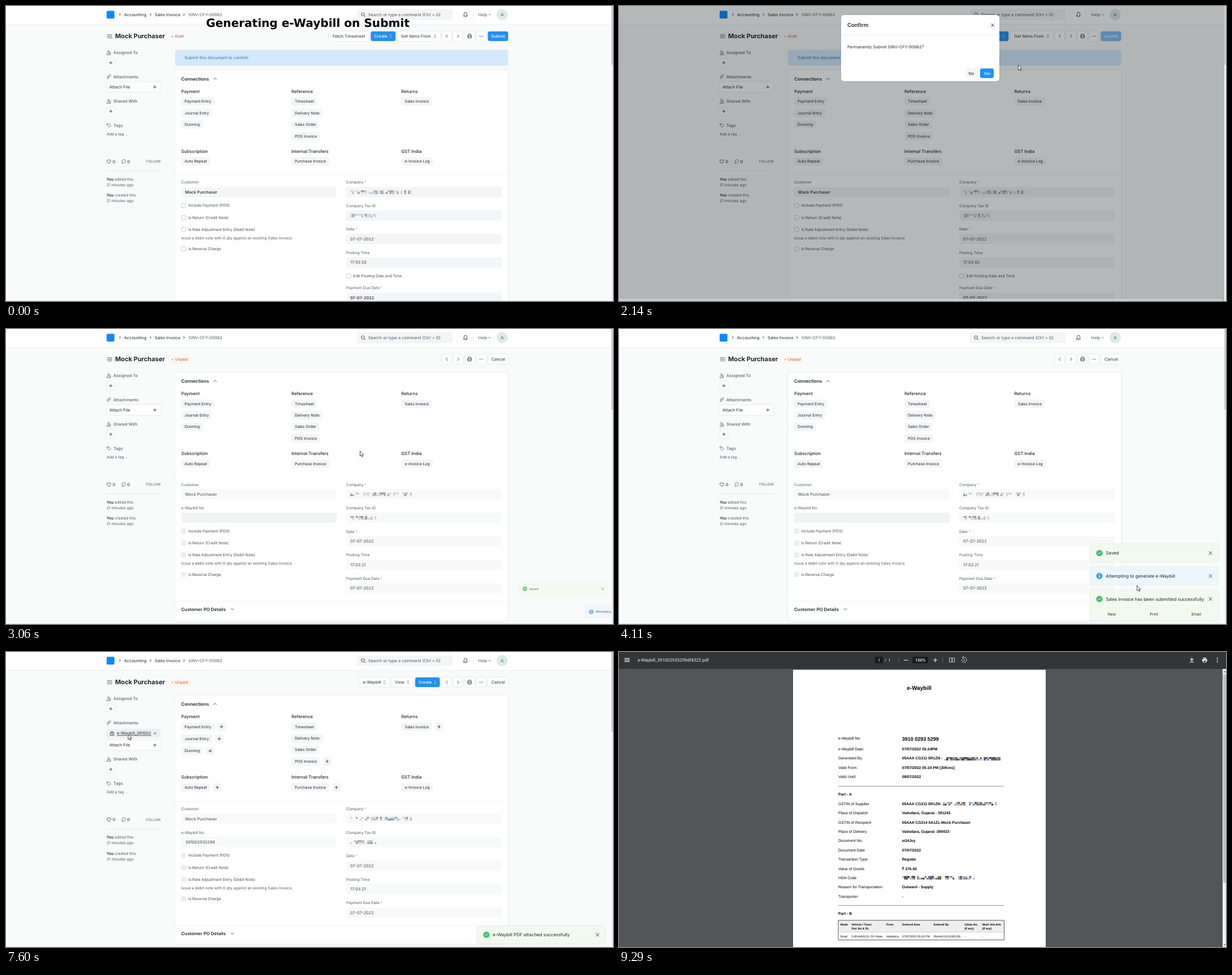
An HTML page that plays this animation: 1074x522 px, repeating every 9.32 s.

```html
<!DOCTYPE html>
<html lang="en">
<head>
<meta charset="utf-8">
<title>Generating e-Waybill on Submit</title>
<style>
  html, body { margin: 0; width: 100%; height: 100%; overflow: hidden; background: #f9fafa; }
  svg { display: block; width: 1074px; height: 522px; text-rendering: geometricPrecision; }
  text { font-family: Inter, sans-serif; white-space: pre; }
  .pdf text { font-family: "Liberation Sans", Arial, sans-serif; }
  .bar text { font-family: Roboto, sans-serif; }
  .caption { font: bold 20.1px "DejaVu Sans", sans-serif; }
  .line { fill: none; stroke-width: .8; stroke-linecap: round; stroke-linejoin: round; }
</style>
</head>
<body>
<svg id="stage" viewBox="0 0 1074 522" xmlns="http://www.w3.org/2000/svg"></svg>
<script>
const LOOP = 9320;
const NAME = 'Mock Purchaser';
const INK = '#1f272e', GREY = '#505a62', BLUE = '#2490ef', PILL = '#f4f5f6', EDGE = '#e4e8ea';
const pen = document.createElement('canvas').getContext('2d');

// Drawing helpers: y of a text is the middle of its capitals.
function text(x, y, size, str, { w = 400, f = INK, a = 'start', extra = '' } = {}) {
  return `<text x="${x}" y="${y + size * .36}" font-size="${size}" font-weight="${w}" fill="${f}" text-anchor="${a}" ${extra}>${str}</text>`;
}
const rect = (x, y, w, h, fill, r = 0, extra = '') =>
  `<rect x="${x}" y="${y}" width="${w}" height="${h}" fill="${fill}" rx="${r}" ${extra}/>`;
const line = (d, color = GREY, width = .8) =>
  `<path class="line" d="${d}" stroke="${color}" style="stroke-width:${width}"/>`;
const circle = (x, y, r, fill, extra = '') => `<circle cx="${x}" cy="${y}" r="${r}" fill="${fill}" ${extra}/>`;
const group = (id, body, extra = '') => `<g id="${id}" ${extra}>${body}</g>`;
const plus = (x, y, c = INK) => line(`M${x - 2.5} ${y}h5m-2.5-2.5v5`, c);
const cross = (x, y, r = 2.4, c = INK) => line(`M${x - r} ${y - r}l${2 * r} ${2 * r}m0-${2 * r}l-${2 * r} ${2 * r}`, c, .9);
const right = (x, y, c = INK, s = 1) => line(`M${x - s} ${y - 2 * s}l${2 * s} ${2 * s}l-${2 * s} ${2 * s}`, c, .9);
const left = (x, y) => line(`M${x + 1.2} ${y - 2.4}l-2.4 2.4l2.4 2.4`, INK, .9);
const down = (x, y, c = INK, s = 2) => line(`M${x - s} ${y - s / 2}l${s} ${s}l${s}-${s}`, c);
const sorter = (x, y, c) => line(`M${x - 1.4} ${y - 1.2}l1.4-1.4l1.4 1.4M${x - 1.4} ${y + 1.2}l1.4 1.4l1.4-1.4`, c, .7);
const shadow = 'style="filter:drop-shadow(0 .5px 1px rgba(25,39,52,.16))"';

function width(str, size) {
  pen.font = '400 100px Inter, sans-serif';
  return pen.measureText(str).width * size / 100;
}

function mosaic(x, y, w, h, seed, colors, fill = .8) {
  const rnd = () => (seed = (seed * 16807) % 2147483647) / 2147483647;
  const cw = 3.3, ch = h / 2;
  let out = '';
  for (let i = 0; i < w / cw; i++) {
    const gap = rnd() > .88;
    for (let j = 0; j < 2; j++) {
      const c = colors[Math.floor(rnd() * colors.length)];
      if (rnd() < fill && !gap) out += rect(x + i * cw, y + j * ch, cw, ch, c);
    }
  }
  return out;
}
const soft = ['#8b949d', '#b9c0c7', '#d5dbe0', '#c3d5e5', '#e0d3c5', '#a5abb2'];
const strong = ['#2f3743', '#8a6a55', '#6d87a5', '#b9aaa0', '#51565f', '#a8bccf'];

function button(x, w, label, { primary, arrows, y = 53.5, id = '' } = {}) {
  const f = primary ? '#fff' : INK;
  return rect(x, y - 8.5, w, 17, primary ? BLUE : '#fff', 3.4, shadow + id) +
    text(x + 6, y, 7.3, label, { f, w: primary ? 500 : 400 }) +
    (arrows ? sorter(x + w - 8.5, y, f) : '');
}

function navbar() {
  return rect(0, 0, 1074, 32.5, '#fff') + rect(0, 32, 1074, .8, '#e8ecee') +
    rect(178, 8.5, 13.8, 13.8, '#0a89ff', 2) +
    right(201.5, 15) + text(209, 15, 7.35, 'Accounting') +
    right(255.8, 15) + text(263, 15, 7.3, 'Sales Invoice') +
    right(315, 15) + text(322.8, 15, 7.25, 'SINV-CFY-00062', { f: GREY }) +
    rect(621, 5.5, 169, 19.5, PILL, 4) +
    circle(631.5, 14.8, 2.8, 'none', `stroke="${INK}" stroke-width=".8"`) + line('M633.6 17l2 2', INK) +
    text(641, 15.3, 7.33, 'Search or type a command (Ctrl + G)', { f: GREY }) +
    line('M809.5 17.8h7c-1.3-1.2-1-2.5-1-4a2.5 2.7 0 0 0-5 0c0 1.500 .3 2.800-1 4zm2.500 1.300a1.200 1.200 0 0 0 2 0', INK) +
    rect(826, 9, .7, 12, '#dde2e5') + text(835.5, 15, 7.3, 'Help', { f: GREY }) + down(855.6, 15.5, GREY, 1.8) +
    circle(877.8, 15.3, 10, '#dcebe7') + text(877.8, 15.3, 7.6, 'A', { a: 'middle', f: '#41645a' });
}

function tools() {
  const box = x => rect(x, 45, 16.5, 17, '#fff', 3.4, shadow);
  return [771.6, 791.6, 812, 832.5].map(box).join('') +
    left(779.8, 53.5) + right(800, 53.5, INK, 1.2) +
    line('M818 52v-2.300h4.500v2.300m-4.500 3.300h-1.200v-3.300h6.900v3.300h-1.200m-4.500-1.200h4.500v2.800h-4.500z', INK, .7) +
    [837.9, 840.6, 843.3].map(x => circle(x, 53.5, .65, INK)).join('');
}

function sidebar() {
  const head = (y, label) => text(190, y, 7.3, label, { w: 500, f: '#57626b' });
  const add = y => circle(185.5, y, 8, '#fff', shadow) + plus(185.5, y);
  const log = (y, verb) => text(178, y, 6.75, `<tspan font-weight="600" fill="${INK}">You</tspan> ${verb} this`, { f: GREY }) +
    text(178, y + 10, 6.75, '21 minutes ago', { f: GREY });
  const person = y => circle(181.5, y - 1.7, 1.6, 'none', `stroke="${GREY}" stroke-width=".8"`) +
    line(`M178.500 ${y + 3.300}c0-3.500 6-3.500 6 0zm6.200-3.800v3`);
  return person(82.5) + head(82.5, 'Assigned To') + add(100.5) +
    line('M179 126l3.400-3.700c1.500-1.500 3.700 .3 2.200 2l-3.700 4c-1 1-2.500-.2-1.500-1.300l3.200-3.500') + head(125.3, 'Attachments') +
    group('file', rect(178, 136, 95.500, 15.800, '#edf0f1', 3) +
      line('M185 142.800h5.600v4.600h-5.600zm1.200 0c0-3.600 3.200-3.600 3.200 0m-1.600 1.600v1.400', INK) +
      '<clipPath id="cut"><path d="M195 136h62v16h-62z"/></clipPath>' +
      text(196, 143.800, 7.3, 'e-Waybill_391002935299', { extra: 'clip-path="url(#cut)" text-decoration="underline"' }) +
      cross(263.500, 144, 1.700, GREY)) +
    group('side', rect(178, 134.500, 95.500, 17.500, '#fff', 3, shadow) + text(183, 143.3, 7.3, 'Attach File') + plus(263.300, 143.300) +
      person(168.500) + head(168.300, 'Shared With') + add(186.300) +
      line('M179 208.500h3l3.500 3.300-2.900 2.900-3.600-3.400zm1.500 1.500v.1') + head(211.300, 'Tags') +
      text(178, 226.300, 6.75, 'Add a tag ...', { f: GREY }) +
      line('M182 278.500l-3-3c-1.800-2.500 1.500-4.600 3-2.200c1.500-2.400 4.800-.3 3 2.200z', INK) + text(188.800, 275.300, 7.3, '0') +
      text(197.500, 275, 7, '·', { f: GREY }) +
      line('M205.500 278.500v-2a3.300 3 0 1 1 2.500 1.300z') + text(214.500, 275.300, 7.3, '0') +
      text(248, 275, 6.1, 'FOLLOW', { f: GREY }) + rect(178, 291.500, 96, .8, '#dfe4e6') +
      log(306.300, 'edited') + log(335, 'created'));
}

// mode 0: draft, 1: submitted, 2: submitted with actions
function form(mode) {
  const up = mode ? -36.8 : 0, grown = mode === 2, low = up + (grown ? 1.4 : 0), d = up + (grown ? 2.4 : 0);
  const pill = (x, y, label, more) => {
    const w = width(label, 6.83) + 11.5;
    return rect(x, y - 7.3, w, 14.6, PILL, 3) + text(x + 6, y, 6.83, label) +
      (more && grown ? rect(x + w + 5.300, y - 7.3, 15, 14.6, PILL, 3) + plus(x + w + 12.8, y) : '');
  };
  const list = (x, y, title, names, more) => text(x, y, 7.8, title, { w: 500 }) +
    names.map((n, i) => pill(x, y + 18 + i * (grown && x < 400 ? 21.4 : 20.4), n, more.includes(n))).join('');
  const field = (x, y, label, value, req, bg = mode ? '#f8f9f9' : PILL, w = 400) =>
    text(x, y, 6.72, label + (req ? ' <tspan fill="#f08c78">*</tspan>' : ''), { f: GREY }) +
    rect(x, y + 8.200, 275, 18, bg, 3) + text(x + 7, y + 17.3, 7.3, value, { w, f: w > 400 ? INK : '#414b53' });
  const check = (x, y, label) =>
    rect(x + .5, y - 3.700, 7.500, 7.500, mode ? '#eef0f1' : '#fff', 1.800, `stroke="${mode ? '#d3d8db' : '#a9b2b9'}" stroke-width=".7"`) +
    text(x + 12.600, y, 6.72, label, { f: '#3f4a53' });
  const top = 113.5 + up, R = 602, L = 310, row = i => 312 + d + 41.5 * i;
  const c = mode ? 394.3 + d : 353;

  let out = rect(299, top, 589.5, 440, '#fff', 4, shadow) +
    text(L, 129 + up, 8, 'Connections', { w: 600 }) + line(`M367.500 ${130 + up}l2.500-2.400l2.500 2.400`, INK) +
    list(L, 151 + up, 'Payment', ['Payment Entry', 'Journal Entry', 'Dunning'], ['Payment Entry', 'Journal Entry', 'Dunning']) +
    list(505, 151 + up, 'Reference', ['Timesheet', 'Delivery Note', 'Sales Order', 'POS Invoice'], ['POS Invoice']) +
    list(699.5, 151 + up, 'Returns', ['Sales Invoice'], ['Sales Invoice']) +
    list(L, 257 + low, 'Subscription', ['Auto Repeat'], ['Auto Repeat']) +
    list(505, 257 + low, 'Internal Transfers', ['Purchase Invoice'], ['Purchase Invoice']) +
    list(699.5, 257 + low, 'GST India', ['e-Invoice Log'], []) +
    rect(299, 298.500 + d, 589.500, .7, '#edf0f2') +
    field(L, row(0), 'Customer', NAME, false, mode ? '#f8f9f9' : PILL, mode ? 400 : 500) +
    check(L, c, 'Include Payment (POS)') + check(L, c + 21.300, 'Is Return (Credit Note)') +
    check(L, c + 42.200, 'Is Rate Adjustment Entry (Debit Note)') +
    text(L, c + 57.300, 6.78, 'Issue a debit note with 0 qty against an existing Sales Invoice', { f: GREY }) +
    check(L, c + 76.700, 'Is Reverse Charge') +
    field(R, row(0), 'Company', '', true) + field(R, row(1), 'Company Tax ID', '') +
    mosaic(609, row(0) + 14.200, 106, 6.400, 71 + mode, soft, .72) + mosaic(609, row(1) + 14.200, 46, 6.400, 911 + mode, soft, .75) +
    field(R, row(2), 'Date', '07-07-2022', true) +
    field(R, row(3), 'Posting Time', mode ? '17:03:21' : '17:03:02');
  if (!mode) {
    out += check(R, 477.600, 'Edit Posting Date and Time') + field(R, 499, 'Payment Due Date', '07-07-2022', true, PILL, 500) +
      rect(299, 77.500, 589.500, 28, '#d3e9fc', 4) + text(316, 91.300, 7.33, 'Submit this document to confirm', { f: '#2f73ab' }) +
      circle(294.300, 54, 1.100, '#e24c4c') + text(299, 54, 6.6, 'Draft', { f: '#b5413b' }) +
      button(572, 69.500, 'Fetch Timesheet') + button(645.500, 43.700, 'Create', { primary: 1, arrows: 1 }) +
      button(693, 74.600, 'Get Items From', { arrows: 1 }) + button(852.600, 35.800, 'Submit', { primary: 1, id: ' id="submit"' });
  } else {
    out += field(L, row(1), 'e-Waybill No.', grown ? '391002935299' : '', false, grown ? '#f8f9f9' : '#f2f3f3') +
      field(R, row(4), 'Payment Due Date', '07-07-2022', true) +
      rect(299, 518 + d, 589.500, .7, '#edf0f2') +
      text(L, 532.700 + d, 7.9, 'Customer PO Details', { w: 600 }) + down(400.500, 532.700 + d, INK, 2.500) +
      rect(299, 550.500 + d, 589.500, .7, '#edf0f2') +
      rect(287.5, 46.500, 39, 15, '#fff5f0', 7) + circle(294.300, 54, 1.100, '#d9772b') + text(299, 54, 6.7, 'Unpaid', { f: '#b35f24' }) +
      button(853, 35.500, 'Cancel');
    if (grown) out += button(625.500, 52.500, 'e-Waybill', { arrows: 1 }) + button(682, 38, 'View', { arrows: 1 }) +
      button(724, 43.500, 'Create', { primary: 1, arrows: 1 });
  }
  return group('form' + mode, out);
}

const toasts = [
  { label: 'Saved', start: 2900, end: 5400 },
  { label: 'Attempting to generate e-Waybill', info: 1, start: 2960, end: 5920 },
  { label: 'Sales Invoice has been submitted successfully', start: 3200, end: 5980, actions: 1 },
  { label: 'e-Waybill generated successfully', start: 5300, end: 6880 },
  { label: 'e-Waybill PDF attached successfully', start: 6940, end: 9000 }
];
function toast(o, i) {
  o.h = o.actions ? 54 : 31.3;
  const mark = o.info ? line('M850 15v3.300m0-5.600v.1', '#fff', 1.200) : line('M847.600 15.700l1.700 1.700l3-3.300', '#fff', 1);
  return group('toast' + i, rect(833.500, 0, 226.500, o.h, o.info ? '#edf6fd' : '#f2f9ee', 4, shadow) +
    circle(850, 15.700, 5.600, o.info ? '#4a9ee3' : '#48bb74') + mark +
    text(861.300, 15.700, 7.92, o.label) + cross(1046.500, 15.700, 2.600) +
    (o.actions ? ['New', 'Print', 'Email'].map((s, k) => text(872 + k * 74.700, 42.500, 6.75, s, { a: 'middle' })).join('') : ''));
}

const modal = group('modal', rect(393, 16, 280, 117, '#fff', 5, shadow) +
  text(404, 34, 9.5, 'Confirm', { w: 600 }) + cross(661, 34) + rect(393, 51, 280, .7, EDGE) +
  text(404, 72, 7.3, 'Permanently Submit SINV-CFY-00062?') +
  rect(613, 110.5, 21, 17, PILL, 3.400) + text(618.500, 119, 7.3, 'No') +
  rect(639, 110.5, 24, 17, BLUE, 3.400) + text(645, 119, 7.3, 'Yes', { f: '#fff', w: 500 }));

function viewer() {
  const W = '#f1f1f1', white = { f: W };
  const bar = rect(0, 0, 1074, 30, '#323639') +
    [11.300, 14, 16.700].map(y => rect(9.500, y - .5, 9.500, 1.200, W)).join('') +
    text(33, 14.500, 7.83, 'e-Waybill_391002935299df4322.pdf', white) +
    rect(453, 8.500, 14, 11.500, '#191b1c') + text(460, 14.500, 7.4, '1', { f: W, a: 'middle' }) +
    text(470, 14.500, 7.4, '/', white) + text(476.500, 14.500, 7.4, '1', white) +
    rect(494.500, 9.500, .7, 9.500, '#70757a') + line('M504.500 14.500h6.500', W, 1.100) +
    rect(519.500, 8.500, 27.500, 11.500, '#191b1c') + text(533.300, 14.500, 7.4, '100%', { f: W, a: 'middle', w: 500 }) +
    line('M556.500 14.500h6.500m-3.250-3.250v6.500', W, 1.100) + rect(572, 9.500, .7, 9.500, '#70757a') +
    line('M584.800 10.500h9v7.500h-9zm4.500 1.700v4.200m-1.300-3l1.300-1.300l1.300 1.300m-2.600 1.700l1.300 1.300l1.300-1.300', W) +
    line('M606 14.500l3-3l3 3l-3 3zm2.500-5.200h2a4.400 4.400 0 0 1 0 9.400m-1.500-10.800l-1.500 1.400l1.500 1.500', W) +
    line('M1013.500 10v5m-2.500-2.300l2.500 2.500l2.500-2.500m-5.500 5h6', W, 1.200) +
    rect(1032, 12.500, 8.500, 4.500, W, 1) + rect(1033.500, 10, 5.500, 1.700, W) + rect(1034, 15, 4.500, 3.500, '#323639', 0, `stroke="${W}" stroke-width=".8"`) +
    [10.800, 14.300, 17.800].map(y => circle(1058.600, y, 1, W)).join('');

  const rows = (y, pairs) => pairs.map(([k, v], i) =>
    text(388, y + i * 16.400, 6.75, k, { f: '#000' }) + text(500.700, y + i * 16.400, 6.72, v, { f: '#000', w: 700 })).join('');
  const bold = (x, y, s, str, a) => text(x, y, s, str, { f: '#000', w: 700, a });
  const cols = [391.700, 411.500, 473, 501.300, 556.500, 611.200, 642.700];
  const heads = ['Mode', 'Vehicle / Trans|Doc No &amp; Dt.', 'From', 'Entered Date', 'Entered By', 'Cdata No.|(If any)', 'Multi Veh.Info|(If any)'];
  const cells = ['Road', 'GJ01AA0123 / Dt: None', 'Vadodara', '07/07/2022 05:24 PM', '05AAACG2115R1ZN', '-', '-'];
  const page = rect(308, 31.500, 447, 492, '#fff') + bold(531, 63, 10, 'e-Waybill', 'middle') +
    text(388, 152.500, 6.75, 'e-Waybill No:', { f: '#000' }) + bold(500.700, 154, 9, '3910 0293 5299') +
    rows(171.500, [['e-Waybill Date:', '07/07/2022 05:24PM'], ['Generated By:', '05AAA CG211 5R1ZN -'],
      ['Valid From:', '07/07/2022 05:24 PM [30Kms]'], ['Valid Until:', '08/07/2022']]) +
    mosaic(576, 186, 99, 6, 37, strong, .95) + rect(388, 237.200, 293.500, .8, '#777') +
    bold(388, 252, 6.75, 'Part - A') +
    rows(268.300, [['GSTIN of Supplier', '05AAA CG211 5R1ZN-'], ['Place of Dispatch', 'Vadodara, Gujarat - 391243'],
      ['GSTIN of Recipient', '05AAA CG214 0A1ZL-' + NAME], ['Place of Delivery', 'Vadodara, Gujarat -390023'],
      ['Document No.', 'w24Jvy'], ['Document Date', '07/07/2022'], ['Transaction Type:', 'Regular'],
      ['Value of Goods', '₹ 376.00'], ['HSN Code', ''], ['Reason for Transportation', 'Outward - Supply'], ['Transporter', '-']]) +
    mosaic(573, 265.500, 97, 6, 53, strong, .75) + mosaic(501, 396.500, 127, 6, 88, strong, .8) +
    rect(388, 448.200, 293.500, .8, '#777') + bold(388, 463, 6.75, 'Part - B') +
    rect(388, 475, 293.500, 20.500, '#eeeeec') + rect(388, 474.800, 293.500, 34.700, 'none', 0, 'stroke="#333" stroke-width=".8"') +
    rect(388, 495, 293.500, .5, '#aaa') +
    heads.map((h, i) => h.split('|').map((s, j) => bold(cols[i], 482 + j * 6.800, 5.1, s)).join('')).join('') +
    cells.map((s, i) => text(cols[i], 503, 5.1, s, { f: '#000' })).join('');

  return group('viewer', rect(0, 0, 1074, 522, '#525659') +
    group('page', page + rect(1068, 30, 6, 492, '#f1f1f1') + rect(1069, 39.500, 5, 369, '#c1c1c1') +
      '<path d="M1069.500 36l2-2.500l2 2.500zM1069.500 517l2 2.500l2-2.500z" fill="#666"/>', 'class="pdf"') +
    group('bar', bar, 'class="bar"'));
}

const stage = document.getElementById('stage');
stage.innerHTML = rect(0, 0, 1074, 522, '#f9fafa') + navbar() +
  [50.800, 53.500, 56.200].map(y => rect(179, y - .4, 8.800, .9, GREY)).join('') +
  text(193, 53.500, 11.1, NAME, { w: 700 }) + sidebar() + form(0) + form(1) + form(2) + tools() +
  toasts.map(toast).join('') +
  group('dark', rect(0, 0, 1074, 522, '#0a1418')) + group('light', rect(0, 0, 1074, 522, '#b9c2c7')) +
  group('edge', rect(0, 521, 1068, 1, '#dfe3e5')) + group('strip', rect(0, 518, 1068, 4, '#c3cbd3', 2)) +
  rect(1071, 0, 3, 522, '#eff1f2') + rect(1071, 0, 3, 104, '#c8cdd1', 0, 'id="thumb"') + modal + viewer() +
  '<text id="caption" class="caption" x="354" y="37.400">Generating e-Waybill on Submit</text>' +
  group('cursor', '<path d="M0 0V9l2.100-1.900l1.500 3.300l1.500-.7l-1.500-3.100h2.900z" fill="#fff" stroke="#222" stroke-width=".8"/>');

const part = Object.fromEntries([...stage.querySelectorAll('[id]')].map(e => [e.id, e]));
const show = (id, on) => { part[id].style.display = on ? '' : 'none'; };
const ramp = (t, a, b) => Math.min(1, Math.max(0, (t - a) / (b - a)));
const smooth = k => k * k * (3 - 2 * k);

// time, x, y
const path = [
  [1200, 1040, 524], [1550, 859, 53], [1850, 859, 53], [2290, 651, 123], [2420, 651, 123], [2590, 586, 192],
  [2890, 586, 192], [3770, 996, 436], [3900, 996, 436], [4110, 916.500, 454], [4940, 916.500, 454], [5850, 940, 492],
  [6220, 950.500, 513], [6810, 426, 384], [6840, 426, 384], [7560, 216, 146], [7780, 216, 146], [8050, 749.500, 204.500],
  [8900, 749.500, 204.500], [9290, 1053, 520]
];
function pointer(t) {
  const i = path.findIndex(p => p[0] > t);
  if (i < 0) return path.at(-1).slice(1);
  if (!i) return path[0].slice(1);
  const [a, b] = [path[i - 1], path[i]], k = smooth(ramp(t, a[0], b[0]));
  return [a[1] + (b[1] - a[1]) * k, a[2] + (b[2] - a[2]) * k];
}

function stack(t) {
  let bottom = 516;
  for (let i = toasts.length - 1; i >= 0; i--) {
    const o = toasts[i], on = t >= o.start && t < o.end + 180;
    show('toast' + i, on);
    if (!on) continue;
    const enter = ramp(t, o.start, o.start + 260), leave = ramp(t, o.end, o.end + 180);
    const slide = 300 * (1 - smooth(ramp(enter, 0, .8))) + 300 * smooth(ramp(leave, .2, 1));
    const s = Math.min(.7 + .3 * ramp(enter, .8, 1), 1 - .3 * ramp(leave, 0, .2));
    const y = bottom - o.h, cx = 946.700, cy = o.h / 2;
    part['toast' + i].setAttribute('transform', `translate(${slide + cx} ${y + cy}) scale(${s}) translate(${-cx} ${-cy})`);
    part['toast' + i].style.opacity = s;
    bottom = y - 9.300;
  }
}

function draw(t) {
  const mode = t < 2890 ? 0 : t < 4940 ? 1 : 2, attached = t >= 6840;
  for (let m = 0; m < 3; m++) show('form' + m, m === mode);
  show('caption', t < 1200);
  part.submit.setAttribute('fill', t < 1750 ? BLUE : '#7cbdf5');
  show('file', attached);
  part.side.setAttribute('transform', `translate(0 ${attached ? 21.4 : 0})`);
  stack(t);

  part.dark.style.opacity = .3 * ramp(t, 1750, 1850) * (1 - ramp(t, 2320, 2390));
  part.light.style.opacity = .4 * ramp(t, 2320, 2390) * (1 - ramp(t, 2440, 2590));
  const open = ramp(t, 1850, 1990) * (1 - ramp(t, 2320, 2400));
  show('modal', open > 0);
  part.modal.style.opacity = open;
  part.modal.setAttribute('transform', `translate(0 ${-18 * (1 - smooth(open))})`);
  show('strip', t >= 1750 && t < 2890);
  part.thumb.setAttribute('height', t < 2320 ? 104 : t < 2890 ? 122 : mode === 1 ? 143 : 141);

  show('viewer', t >= 7780);
  show('page', t >= 8280);
  show('cursor', t >= 1200);
  part.cursor.setAttribute('transform', `translate(${pointer(t)})`);
}

const begin = performance.now();
function tick() {
  draw((performance.now() - begin) % LOOP);
  requestAnimationFrame(tick);
}
tick();
</script>
</body>
</html>
```
